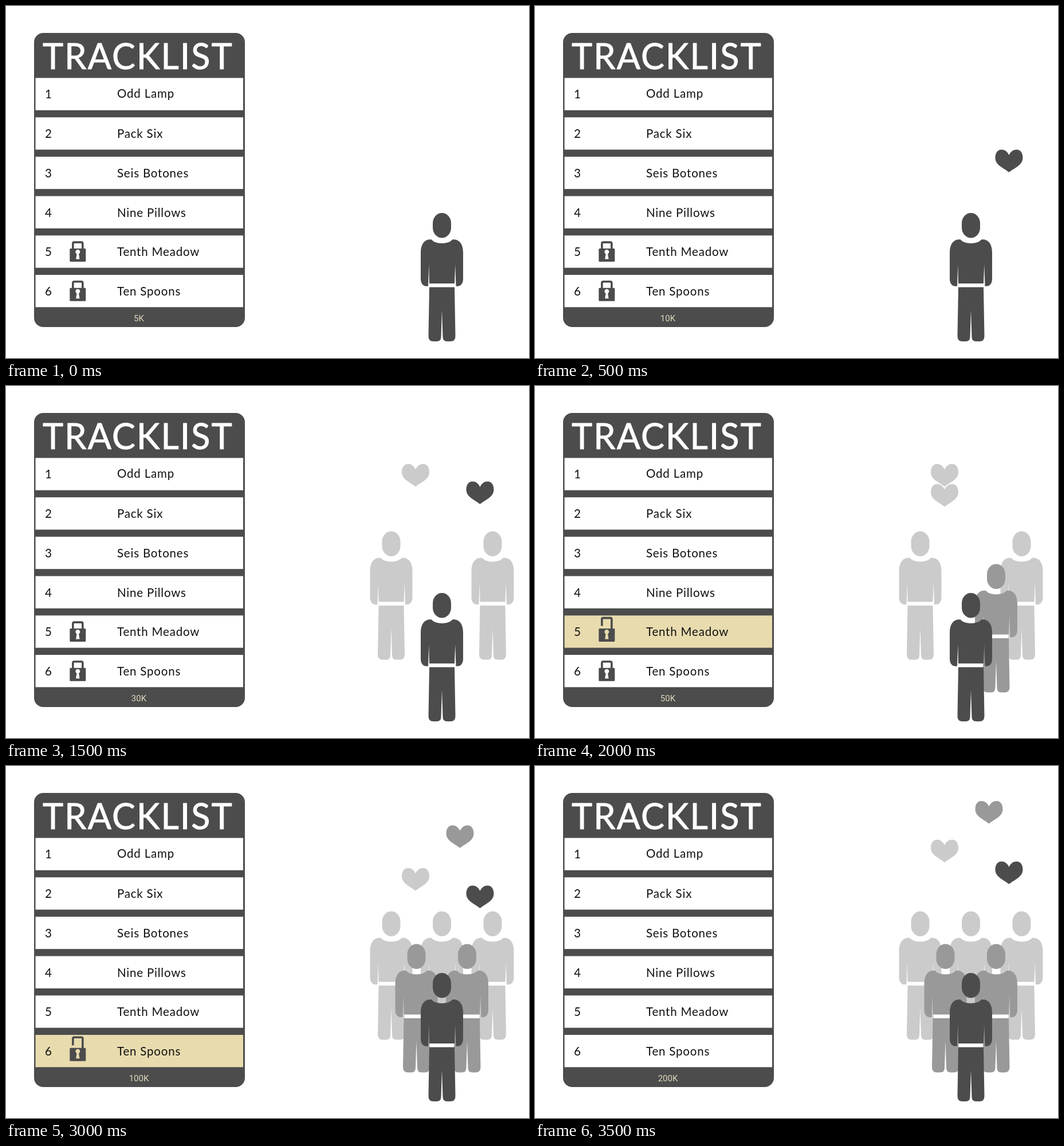
An HTML page with a canvas for the animation above (4000 ms loop, 913 px wide and 614 px high).

```html
<!DOCTYPE html>
<html lang="en">
<head>
<meta charset="utf-8">
<title>Tracklist</title>
<style>
  html, body { margin: 0; width: 100%; height: 100%; overflow: hidden; background: #fff; }
  canvas { display: block; }
</style>
</head>
<body>
<canvas id="stage" width="913" height="614"></canvas>
<script>
const ctx = document.getElementById('stage').getContext('2d');
const STEP = 500;
const DARK = '#4c4c4c', MID = '#999', LIGHT = '#cbcbcb', GOLD = '#e8dbae';
const TITLES = ['Odd Lamp', 'Pack Six', 'Seis Botones', 'Nine Pillows', 'Tenth Meadow', 'Ten Spoons'];

// Back row first; "from" is the step at which each person joins.
const CROWD = [
  { dx: -88.5, dy: -107.5, color: LIGHT, from: 2 },
  { dx: 88.5, dy: -107.5, color: LIGHT, from: 3 },
  { dx: 0, dy: -107.5, color: LIGHT, from: 6 },
  { dx: 44, dy: -50.5, color: MID, from: 4 },
  { dx: -44.5, dy: -50.5, color: MID, from: 5 },
  { dx: 0, dy: 0, color: DARK, from: 0 }
];

const light = y => [715, y, LIGHT];
const mid = y => [792.5, y, MID];
const dark = y => [827.5, y, DARK];
const STEPS = [
  { plays: '5K', hearts: [] },
  { plays: '10K', hearts: [dark(250.5)] },
  { plays: '25K', hearts: [dark(208.5)] },
  { plays: '30K', hearts: [light(136), dark(166.5)] },
  { plays: '50K', hearts: [light(136), light(171)] },
  { plays: '55K', hearts: [mid(173.5), dark(250.5)] },
  { plays: '100K', hearts: [mid(103.5), light(178), dark(208.5)] },
  { plays: '200K', hearts: [mid(61), light(128.5), dark(166.5)] }
];

// Step at which a row lights up; its lock is gone afterwards.
const UNLOCK = { 4: 4, 5: 6 };

function fillPath(d, color) {
  ctx.fillStyle = color;
  ctx.fill(new Path2D(d));
}

function box(x, y, w, h, r, color) {
  ctx.fillStyle = color;
  ctx.beginPath();
  ctx.roundRect(x, y, w, h, r);
  ctx.fill();
}

function at(x, y, draw) {
  ctx.save();
  ctx.translate(x, y);
  draw();
  ctx.restore();
}

function label(str, x, y, font, color, spacing = 0, align = 'left') {
  ctx.font = font;
  ctx.letterSpacing = spacing + 'px';
  ctx.textAlign = align;
  ctx.fillStyle = color;
  ctx.fillText(str, x, y);
}

function person({ dx, dy, color }) {
  at(761 + dx, 361 + dy, () => {
    box(-16, 0, 32, 43.5, [{ x: 16, y: 18 }], color);
    fillPath('M-18 46.5 C-12 55 12 55 18 46.5 C29 45 37 53 37 69 V115' +
      ' C37 124 32 129 24.5 127.5 L23.3 90 L22 123 H-22 L-22.7 90 L-24 127.5' +
      ' C-32 129 -37 124 -37 115 V69 C-37 53 -29 45 -18 46.5 Z', color);
    fillPath('M-22 129.5 H22 L23.5 215 Q23.5 224 15 224 H9 Q1.5 224 1.5 216' +
      ' L0 169 L-1.5 216 Q-1.5 224 -9 224 H-15 Q-23.5 224 -23.5 215 Z', color);
  });
}

function heart([x, y, color]) {
  at(x, y, () => fillPath('M0 9.5 C-3 3 -8 0 -13 0 C-20 0 -24 6 -24 14' +
    ' C-24 27 -11 31 0 39.5 C11 31 24 27 24 14 C24 6 20 0 13 0 C8 0 3 3 0 9.5 Z', color));
}

function lock(y, open, hole) {
  at(125.3, y, () => {
    ctx.strokeStyle = DARK;
    ctx.lineWidth = 3.6;
    ctx.lineJoin = 'round';
    ctx.stroke(new Path2D(open
      ? 'M-8.5 19 V7 Q-8.5 5 -6.5 5 H6.5 Q8.5 5 8.5 7 V25'
      : 'M-8.5 25 V15 Q-8.5 12.5 -6 12.5 H6 Q8.5 12.5 8.5 15 V25'));
    box(-14, 23.5, 28, 23, 1.5, DARK);
    fillPath('M-1.8 33 L-3.2 42 H3.2 L1.8 33 A4 4 0 1 0 -1.8 33 Z', hole);
  });
}

function row(i, step) {
  const y = 125.5 + i * 68.7;
  const active = UNLOCK[i] === step;
  const paper = active ? GOLD : '#fff';
  const font = '20.5px Lato, sans-serif';
  ctx.fillStyle = paper;
  ctx.fillRect(51.5, y, 362.5, 56.3);
  label(i + 1, 68, y + (i ? 36 : 35.5), font, '#111');
  label(TITLES[i], 194, y + (i ? 36 : 34), font, '#111', 0.8);
  if (step <= UNLOCK[i]) lock(y - 0.7, active, paper);
}

function panel(step) {
  box(49, 47, 368, 513, 16, DARK);
  label('TRACKLIST', 64, 110, '61px Lato, sans-serif', '#fff', 2.2);
  ctx.strokeStyle = '#fff';
  ctx.lineWidth = 1;
  ctx.lineJoin = 'round';
  ctx.strokeText('TRACKLIST', 64, 110);
  TITLES.forEach((_, i) => row(i, step));
  label(STEPS[step].plays, 232, 549.5, '15px Roboto, sans-serif', '#e0d8bd', 0, 'center');
}

function frame(now) {
  const step = Math.floor(now / STEP) % STEPS.length;
  ctx.fillStyle = '#fff';
  ctx.fillRect(0, 0, 913, 614);
  panel(step);
  CROWD.filter(p => step >= p.from).forEach(person);
  STEPS[step].hearts.forEach(heart);
  requestAnimationFrame(() => frame(performance.now()));
}

frame(performance.now());
</script>
</body>
</html>
```
